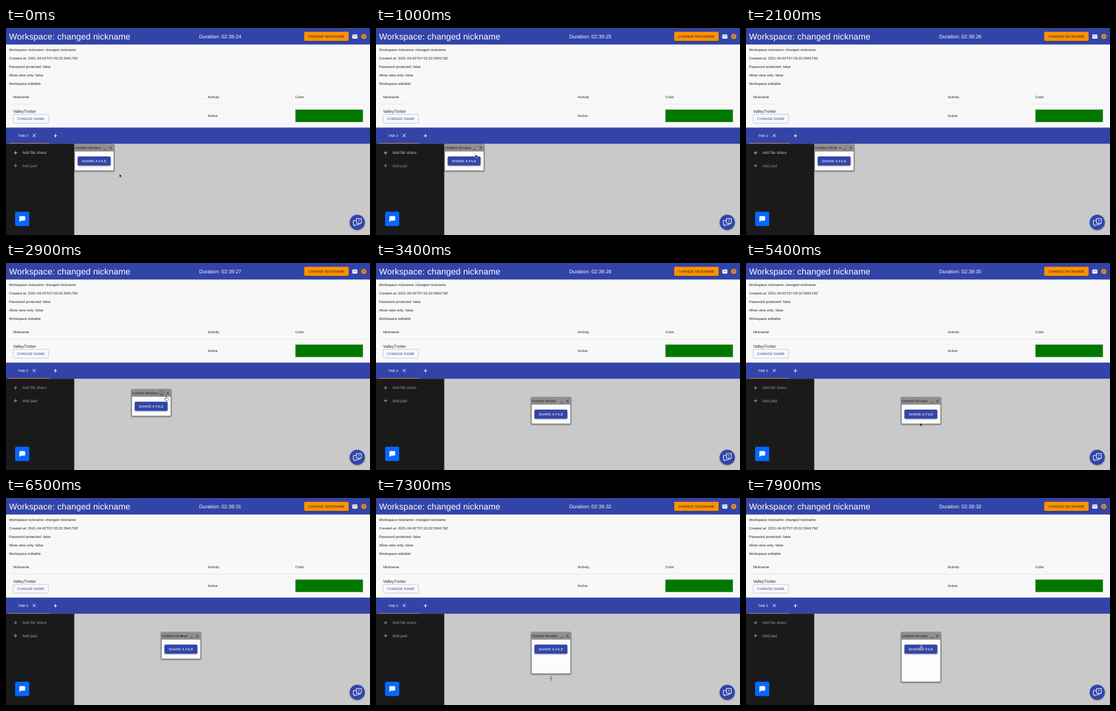
Animation of 600 by 342 pixels, one loop 8000 ms. Source, as an HTML page:

```html
<!DOCTYPE html>
<html lang="en">
<head>
<meta charset="utf-8">
<title>Workspace</title>
<style>
  html, body { margin: 0; width: 100%; height: 100%; overflow: hidden; background: #c9c9c9; }
  svg { display: block; width: 100vw; height: 100vh; }
  text { font-family: "Liberation Sans", Arial, sans-serif; font-size: 5.83px; letter-spacing: .0107em; fill: #222; text-rendering: geometricPrecision; white-space: pre; }
  .caps { letter-spacing: .0286em; }
  .white { fill: #fff; }
  .blue { fill: #3244a8; }
  .item text { font-size: 6.5px; letter-spacing: 0; fill: currentColor; }
  .item path { stroke: currentColor; }
  .line { fill: none; stroke: #fff; stroke-width: 1; }
</style>
</head>
<body>
<svg viewBox="0 0 600 342" preserveAspectRatio="none">
  <defs>
    <filter id="shadow" x="-20%" y="-30%" width="140%" height="180%">
      <feDropShadow dx="0" dy=".9" stdDeviation=".8" flood-opacity=".4"/>
    </filter>
  </defs>

  <rect width="600" height="165" fill="#f8f8f8"/>
  <rect class="blue" width="600" height="27.3"/>
  <text class="white" x="5" y="18.9" style="font-size:14.17px;letter-spacing:.0073em">Workspace: changed nickname</text>
  <text id="duration" class="white" x="318.4" y="16.6" style="font-size:8.33px;letter-spacing:.0075em"></text>
  <rect x="491.5" y="6.3" width="73.3" height="15" rx="1.7" fill="#ff9100" filter="url(#shadow)"/>
  <text class="caps" x="498.2" y="16">CHANGE NICKNAME</text>
  <rect class="white" x="570.8" y="10.7" width="8.4" height="6.7" rx=".8"/>
  <path class="line" d="M571.6 12.1L575 14.3L578.4 12.1" style="stroke:#3244a8;stroke-width:.8"/>
  <circle cx="589.8" cy="14" r="4.3" fill="#ff9100"/>
  <text class="blue" x="589.8" y="16.5" text-anchor="middle" style="font-size:7px;font-weight:bold">?</text>

  <g id="details"></g>
  <text x="11.7" y="116">Nickname</text>
  <text x="332.5" y="116">Activity</text>
  <text x="477" y="116">Color</text>
  <path d="M5 125.6H595" stroke="#dedede" stroke-width=".6"/>
  <text x="11.7" y="139.8" style="font-size:6.67px;letter-spacing:.0094em">ValleyTrotter</text>
  <rect x="11.9" y="142.6" width="58.3" height="14.6" rx="1.6" fill="none" stroke="#a4acd6" stroke-width=".6"/>
  <text class="caps blue" x="18.3" y="152">CHANGE NAME</text>
  <text x="332.5" y="147.2">Active</text>
  <rect x="477" y="134.8" width="111.3" height="20.6" fill="#007800" stroke="#b5c4b5" stroke-width=".6"/>

  <rect x="112" y="191" width="488" height="151" fill="#c9c9c9"/>
  <rect class="blue" y="164.5" width="600" height="26.7"/>
  <rect x="5" y="190.2" width="66.8" height="1" fill="#df8a55"/>
  <text class="caps white" x="20" y="179.6">TAB 0</text>
  <path class="line" d="M44 175.2l5 5m0-5l-5 5M78.7 178h5.6m-2.8-2.8v5.6"/>

  <rect y="191.2" width="112.5" height="150.8" fill="#1a1a1a"/>
  <g id="share" class="item">
    <path d="M12.8 206.2h5.8m-2.9-2.9v5.8"/><text x="27" y="208.4">Add file share</text>
  </g>
  <g id="pad" class="item">
    <path d="M12.8 227.5h5.8m-2.9-2.9v5.8"/><text x="27" y="229.7">Add pad</text>
  </g>

  <g id="win">
    <rect id="frame" width="65" height="44" rx=".8" fill="#fcfcfc" stroke="#505050" stroke-width=".9" filter="url(#shadow)"/>
    <rect x=".4" y=".4" width="64.2" height="11.6" fill="#8e8e8e"/>
    <rect id="hover" x="45" y=".6" width="9" height="11.2" fill="#808080"/>
    <text x=".6" y="8.2">Untitled Window</text>
    <path d="M47.7 8.6h4.1M57.4 4l4.4 4.4m0-4.4l-4.4 4.4" stroke="#222" stroke-width=".7" fill="none"/>
    <rect class="blue" x="5.2" y="20.2" width="54.2" height="15" rx="1.7" filter="url(#shadow)"/>
    <text class="caps white" x="11.9" y="29.8">SHARE A FILE</text>
  </g>

  <rect x="15" y="303.6" width="23.3" height="23.6" rx="2.2" fill="#0568fd"/>
  <path class="white" d="M23.4 310.8h6.8q1.3 0 1.3 1.3v4.8q0 1.3-1.3 1.3h-5.3l-2.8 2.2v-8.3q0-1.3 1.3-1.3z"/>
  <circle class="blue" cx="579" cy="321" r="12.5" filter="url(#shadow)"/>
  <path class="line" d="M577.6 314.8h8.2v7.6h-2.2v2l-2.1-2h-3.9zM577.6 318h-5v7.2h2v2l2.2-2h4.4v-2.8"/>
  <text class="white" x="581.7" y="321" text-anchor="middle" style="font-size:6px">?</text>

  <g id="cursor" stroke-linejoin="round">
    <path id="arrow" d="M0 0v5.8l1.4-1.2.9 2 .9-.4-.9-1.9h1.8z" fill="#000" stroke="#fff" stroke-width=".4"/>
    <g id="cross" fill="none">
      <path d="M-3 0h6M0-3.6v7.2M-1-2.6L0-3.6 1-2.6M-1 2.6L0 3.6 1 2.6" stroke="#fff" stroke-width="1.5"/>
      <path d="M-3 0h6M0-3.6v7.2M-1-2.6L0-3.6 1-2.6M-1 2.6L0 3.6 1 2.6" stroke="#222" stroke-width=".7"/>
    </g>
    <path id="hand" d="M-.7 0q.7-.7 1.3 0v2.6l2.5.6q.8.3.7 1.2l-.7 2.9h-3.8l-2.2-3q0-.9 1-.7l1.2.8z" fill="#fff" stroke="#222" stroke-width=".55"/>
  </g>
</svg>
<script>
const LOOP = 8000, STEP = 100;
const $ = id => document.getElementById(id);

const pointerPath = [
  [0, 187, 241], [300, 187, 241], [1100, 163, 207], [1500, 153, 198],
  [2100, 152, 196], [2600, 156, 198], [2900, 264, 220.5], [3200, 299, 228],
  [4100, 299, 228], [4700, 296, 250], [5400, 287, 264], [6000, 287, 262],
  [6500, 288, 225], [7000, 288, 266], [7400, 289, 304], [7600, 289, 300], [7900, 289, 247]
];
const windowPath = [[2600, 113, 192], [2900, 207, 209], [3200, 256, 222]];
const heightPath = [[7000, 44], [7500, 82]];
const ticks = [100, 1100, 2200, 3100, 4100, 5100, 6100, 7100];

$("details").innerHTML = [
  "Workspace nickname: changed nickname",
  "Created at: 2021-04-02T07:03:32.594178Z",
  "Password protected: false",
  "Allow view only: false",
  "Workspace editable"
].map((line, i) => `<text x="5" y="${37.5 + i * 14.17}">${line}</text>`).join("");

// Interpolates keyed values with a smooth start and stop on each leg.
function sample(path, t) {
  const next = path.findIndex(key => key[0] >= t);
  if (next < 0) return path[path.length - 1].slice(1);
  if (next === 0) return path[0].slice(1);
  const a = path[next - 1], b = path[next];
  const u = (t - a[0]) / (b[0] - a[0]);
  const eased = u * u * (3 - 2 * u);
  return a.slice(1).map((v, i) => v + (b[i + 1] - v) * eased);
}

function pointerKind(t) {
  if (t >= 2700 && t < 3200) return "hand";
  return (t >= 1200 && t < 4400) || t >= 6900 ? "cross" : "arrow";
}

const place = (id, [x, y]) => $(id).setAttribute("transform", `translate(${x} ${y})`);
const show = (id, on) => $(id).setAttribute("visibility", on ? "visible" : "hidden");

function render(t) {
  const seconds = 24 + ticks.filter(tick => tick <= t).length;
  $("duration").textContent = `Duration: 02:39:${seconds}`;

  const kind = pointerKind(t);
  for (const id of ["arrow", "cross", "hand"]) show(id, id === kind);
  show("hover", kind === "hand");
  place("cursor", sample(pointerPath, t));
  place("win", sample(windowPath, t));
  $("frame").setAttribute("height", sample(heightPath, t)[0]);

  const focused = t < 2700;
  $("share").style.color = focused ? "#c4c4c4" : "#959595";
  $("pad").style.color = focused ? "#8c8c8c" : "#a0a0a0";
}

const start = performance.now();
function tick() {
  const t = (performance.now() - start) % LOOP;
  render(Math.floor(t / STEP) * STEP);
  requestAnimationFrame(tick);
}
tick();
</script>
</body>
</html>
```
